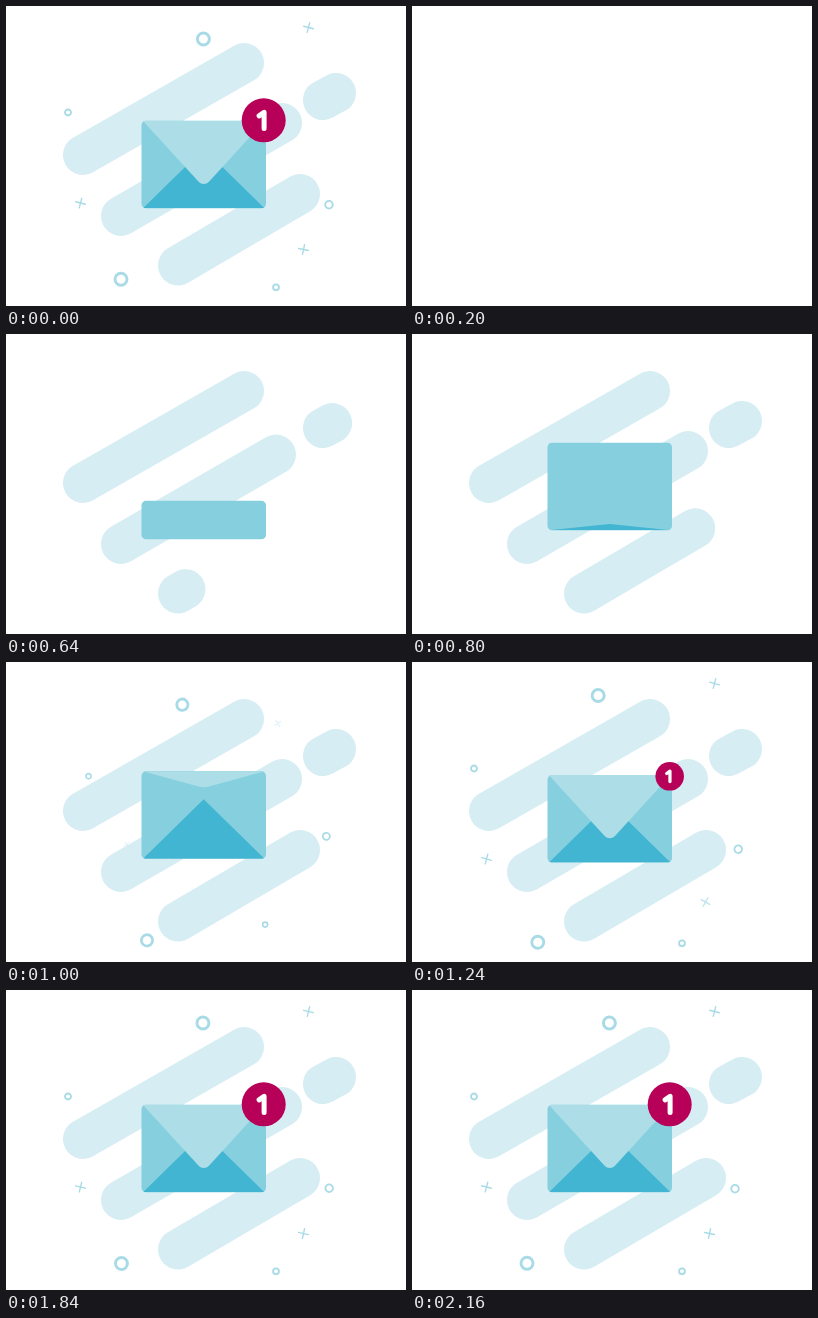
An HTML page with a canvas for the animation above (2.2 s loop, 400 px wide and 300 px high).

```html
<!DOCTYPE html>
<html lang="en">
<head>
<meta charset="utf-8">
<title>New mail</title>
<style>
  html, body { margin: 0; width: 100%; height: 100%; overflow: hidden; background: #fff; }
  canvas { display: block; width: 400px; height: 300px; }
</style>
</head>
<body>
<canvas id="stage"></canvas>
<script>
const LOOP = 2200, STEP = 40, REST = 2160;
const W = 400, H = 300;
const PALE = '#d5edf3', LINE = '#a9dbe7', BODY = '#86cfde';
const FLAP = '#addee8', DEEP = '#41b5d1', BADGE = '#b70058';
const CX = 198, CY = 157.5;

const canvas = document.getElementById('stage');
const ctx = canvas.getContext('2d');
const dpr = window.devicePixelRatio || 1;
canvas.width = W * dpr;
canvas.height = H * dpr;

// x1, y1, x2, y2, start
const bars = [
  [77, 149, 238, 57, 228],
  [115, 210, 276, 117, 428],
  [317, 94, 330, 87, 487],
  [172, 259.5, 294, 188, 604]
];

const rings = [
  { x: 197.4, y: 33, r: 6, w: 3, start: 775, swirl: 10.4 },
  { x: 323, y: 198.7, r: 3.8, w: 1.8, start: 775, swirl: 10.4 },
  { x: 115, y: 273.2, r: 6, w: 2.9, start: 775, swirl: 10.4 },
  { x: 62, y: 106.5, r: 3, w: 1.9, start: 800, swirl: 0 },
  { x: 270, y: 281.3, r: 2.9, w: 1.9, start: 800, swirl: 0 }
];

const crosses = [
  { x: 302.5, y: 21.5, tilt: 15, spin: 260, start: 830 },
  { x: 74.5, y: 197, tilt: 15, spin: 260, start: 845 },
  { x: 297.5, y: 243.5, tilt: 12, spin: -50, start: 1007 }
];

const rad = deg => deg * Math.PI / 180;
const mix = (a, b, k) => a + (b - a) * k;

function ease(t, start, dur) {
  const p = Math.min(1, Math.max(0, (t - start) / dur));
  return p * p * (3 - 2 * p);
}

function drawBar([x1, y1, x2, y2, start], t) {
  if (t <= start) return;
  const k = ease(t, start, 240);
  ctx.strokeStyle = PALE;
  ctx.lineWidth = 40;
  ctx.beginPath();
  ctx.moveTo(x1, y1);
  ctx.lineTo(mix(x1, x2, k), mix(y1, y2, k));
  ctx.stroke();
}

// Moves the origin along a ray from the centre, turned back by lag degrees.
function flyOut(item, k, lag) {
  ctx.translate(CX, CY);
  ctx.rotate(rad(-lag));
  ctx.translate((item.x - CX) * k, (item.y - CY) * k);
  ctx.scale(k, k);
}

function drawRing(ring, t) {
  const k = ease(t, ring.start, 265);
  if (!k) return;
  ctx.save();
  flyOut(ring, k, ring.swirl * Math.pow((REST - t) / 1160, 3));
  ctx.strokeStyle = LINE;
  ctx.lineWidth = ring.w;
  ctx.beginPath();
  ctx.arc(0, 0, ring.r, 0, 7);
  ctx.stroke();
  ctx.restore();
}

function drawCross(cross, t) {
  const k = ease(t, cross.start, 265);
  if (!k) return;
  const left = Math.min(1, (REST - t) / 1200);
  const p = Math.min(1, (t - cross.start) / 265);
  ctx.save();
  flyOut(cross, k, 0);
  ctx.rotate(rad(cross.tilt - cross.spin * Math.pow(left, 4)));
  ctx.globalAlpha = p * p;
  ctx.strokeStyle = LINE;
  ctx.lineWidth = 1.4;
  ctx.beginPath();
  ctx.moveTo(-5, 0);
  ctx.lineTo(5, 0);
  ctx.moveTo(0, -5);
  ctx.lineTo(0, 5);
  ctx.stroke();
  ctx.restore();
}

function drawEnvelope(t) {
  const grow = ease(t, 548, 200);
  if (!grow) return;
  const h = 87.5 * grow;
  const mid = mix(212.5, 152.5, grow) + 6 * ease(t, 900, 520);
  const top = mid - h / 2, bottom = mid + h / 2;

  ctx.save();
  ctx.beginPath();
  ctx.roundRect(135.5, top, 124.5, h, Math.min(4.5, h / 2));
  ctx.fillStyle = BODY;
  ctx.fill();
  ctx.clip();

  const rise = ease(t, 760, 200);
  if (rise) {
    ctx.fillStyle = DEEP;
    ctx.beginPath();
    ctx.moveTo(137, bottom);
    ctx.lineTo(197.7, bottom - 59.5 * rise);
    ctx.lineTo(258.5, bottom);
    ctx.fill();
  }

  const open = ease(t, 922, 240);
  if (open) {
    ctx.translate(197.8, top);
    ctx.scale(1, open);
    ctx.fillStyle = FLAP;
    ctx.beginPath();
    ctx.moveTo(-61, 0);
    ctx.arcTo(0, 66.5, 61, 0, 7);
    ctx.lineTo(61, 0);
    ctx.fill();
  }
  ctx.restore();
}

function drawBadge(t) {
  const k = ease(t, 1120, 200);
  if (!k) return;
  ctx.save();
  ctx.translate(257.7, 114.3);
  ctx.scale(k, k);
  ctx.fillStyle = BADGE;
  ctx.beginPath();
  ctx.arc(0, 0, 22, 0, 7);
  ctx.fill();
  ctx.strokeStyle = '#fff';
  ctx.lineWidth = 5;
  ctx.beginPath();
  ctx.moveTo(-4.6, -4.4);
  ctx.lineTo(0.4, -8);
  ctx.lineTo(0.4, 8.2);
  ctx.stroke();
  ctx.restore();
}

function draw(t) {
  ctx.setTransform(dpr, 0, 0, dpr, 0, 0);
  ctx.fillStyle = '#fff';
  ctx.fillRect(0, 0, W, H);
  ctx.lineCap = ctx.lineJoin = 'round';
  bars.forEach(bar => drawBar(bar, t));
  rings.forEach(ring => drawRing(ring, t));
  crosses.forEach(cross => drawCross(cross, t));
  drawEnvelope(t);
  drawBadge(t);
}

const begin = performance.now();

function tick() {
  const now = (performance.now() - begin) % LOOP;
  const t = Math.floor(now / STEP) * STEP;
  // The finished scene is held before the loop builds it again.
  draw(t < 200 ? REST : t);
  requestAnimationFrame(tick);
}
tick();
</script>
</body>
</html>
```
